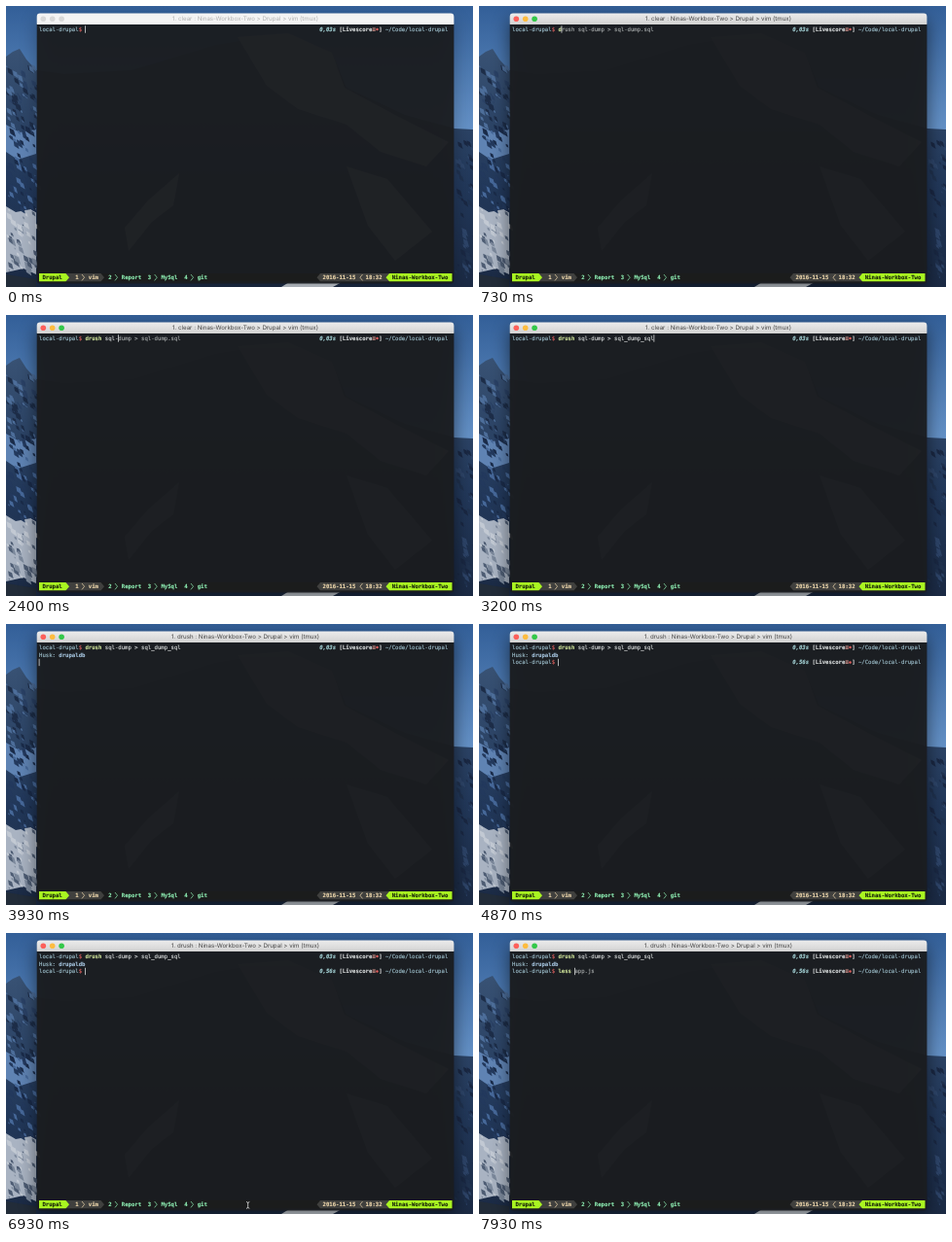
An HTML page that plays this animation: 480x289 px, repeating every 8000 ms.

```html
<!DOCTYPE html>
<html lang="en">
<head>
<meta charset="utf-8">
<title>Terminal session</title>
<style>
  html, body { margin: 0; width: 100%; height: 100%; overflow: hidden; background: #2c4f7e; }
  svg { display: block; width: 100vw; height: 100vh; }
  text { white-space: pre; text-rendering: geometricPrecision; }
  .mono text { font: 5.63px "DejaVu Sans Mono", "Noto Sans Mono", monospace; stroke-width: .1; }
  .mono .bold { font-weight: 700; }
  .mono .slant { font-weight: 700; font-style: italic; }
  #title { font: 6.15px Inter, Roboto, sans-serif; text-anchor: middle; }
</style>
</head>
<body>
<svg viewBox="0 0 480 289" preserveAspectRatio="none">
  <defs>
    <linearGradient id="sky" x2="0" y2="1">
      <stop offset="0" stop-color="#335f98"/>
      <stop offset=".45" stop-color="#6693c8"/>
    </linearGradient>
    <linearGradient id="rock" x2="0" y2="1">
      <stop offset="0" stop-color="#3b5577"/>
      <stop offset=".6" stop-color="#22385a"/>
      <stop offset="1" stop-color="#1b2a44"/>
    </linearGradient>
    <linearGradient id="bar" x2="0" y2="1">
      <stop offset="0" stop-color="#ececec"/>
      <stop offset="1" stop-color="#d2d2d2"/>
    </linearGradient>
    <filter id="blur" x="-20%" y="-20%" width="140%" height="140%">
      <feGaussianBlur stdDeviation="9"/>
    </filter>
  </defs>

  <rect width="480" height="289" fill="url(#sky)"/>
  <path d="M0 52L7 47L14 44L21 55L31 66L60 70L130 66L215 40L288 28L335 48L350 84L410 112L461 126L480 127V289H0Z" fill="url(#rock)"/>
  <path d="M238 32L290 28L335 48L348 84L400 112L455 140L432 165L385 150L350 122L300 106L268 82Z
           M178 172L172 205L150 222L126 252L122 228L146 200ZM350 165L392 178L438 232L400 262L372 226Z" fill="#a5b1c2"/>
  <path d="M0 122L14 130L31 127V152L12 158L0 150Z" fill="#5f83b3"/>
  <path d="M0 206L10 212L31 208V276L18 270L0 274Z" fill="#a9b3c2"/>
  <g id="texture"></g>
  <path d="M0 276L31 281V289H0Z" fill="#222c39"/>
  <path d="M291 284H345L336 289H283Z" fill="#c3cad2"/>
  <rect id="shadow" x="31" y="14" width="430" height="276" rx="4" filter="url(#blur)"/>

  <path d="M31.700 18H460.400V282Q460.400 285.500 457 285.500H35Q31.700 285.500 31.700 282Z" fill="#1b1d20" fill-opacity=".95"/>
  <path id="titlebar" d="M31.700 18.900V11Q31.700 7.600 35 7.600H457Q460.400 7.600 460.400 11V18.900Z"/>
  <g id="lights"></g>
  <text id="title" x="246" y="15.400"></text>
  <g id="status" class="mono"></g>
  <g id="screen" class="mono"></g>
  <path id="pointer" d="M247 276.500Q248.500 276.500 248.700 278Q249 276.500 250.300 276.500M248.700 278V282M247 283.300Q248.500 283.300 248.700 282Q249 283.300 250.300 283.300" fill="none" stroke="#ddd" stroke-width=".8"/>
</svg>
<script>
const LOOP = 8000, LEFT = 34, TOP = 26, CELL = 3.39, LINE = 7.73;
const HOST = 'Ninas-Workbox-Two';
const C = {
  path: '#a3c6d3', red: '#e0605e', command: '#cfe39a', plain: '#dde0e0', ghost: '#a9adad',
  lime: '#a9f521', grey: '#40403e', cream: '#f0d9ae', mint: '#8ff0b5', dark: '#17200a'
};
const $ = id => document.getElementById(id);
const colX = col => LEFT + col * CELL;
const escapeText = s => s.replace(/&/g, '&amp;').replace(/</g, '&lt;');
const put = (col, row, str, fill, cls = '') =>
  `<text x="${colX(col)}" y="${TOP + row * LINE}" fill="${fill}" stroke="${fill}" class="${cls}">${escapeText(str)}</text>`;
const shape = (d, fill) => `<path d="${d}" fill="${fill}"/>`;
const chevron = (x, dir, color) =>
  `<path d="M${x} 276l${2.6 * dir} 3.200l${-2.6 * dir} 3.200" fill="none" stroke="${color}" stroke-width=".7"/>`;

// Small seeded facets of rock and snow on the slopes beside the window.
function drawTexture() {
  let seed = 11;
  const rnd = () => (seed = seed * 16807 % 2147483647) / 2147483647;
  const facets = (x0, width, y0, height, count, tones) => {
    let out = '';
    for (let i = 0; i < count; i++) {
      const x = x0 + rnd() * width, y = y0 + rnd() * height, s = 1 + rnd() * 4;
      out += shape(`M${x} ${y}l${s} ${s * 0.5}l${s * 0.4} ${s * 1.5}l${-s * 1.2} ${-s * 0.8}Z`,
        tones[i % tones.length]);
    }
    return out;
  };
  $('texture').innerHTML = facets(0, 30, 60, 62, 60, ['#1d2d48', '#4d6e9a', '#2a4165'])
    + facets(0, 30, 122, 84, 60, ['#1a2b49', '#466899', '#23395d'])
    + facets(0, 30, 208, 64, 50, ['#7b889b', '#c2c9d3', '#4d5c73'])
    + facets(460, 20, 130, 152, 50, ['#1a2843', '#2e4569', '#20324f']);
}

function drawStatus() {
  const tabs = [[21, '2', 'Report'], [33, '3', 'MySql'], [44, '4', 'git']];
  let out = shape('M33 275H459V283.300H33Z', '#1b1c1c')
    + shape('M62 275H97.500L101 279.150L97.500 283.300H62Z', C.grey)
    + shape('M34 275H61.500L65 279.150L61.500 283.300H34Z', C.lime)
    + shape('M323 275H394V283.300H323L319.500 279.150Z', C.grey)
    + shape('M394 275H458.500V283.300H394L390.500 279.150Z', C.lime)
    + put(1, 33, 'Drupal', C.dark, 'bold')
    + put(11, 33, '1', C.cream, 'bold') + chevron(78, 1, C.cream) + put(15, 33, 'vim', C.cream, 'bold');
  for (const [col, number, name] of tabs)
    out += put(col, 33, number, C.mint, 'bold') + chevron(colX(col + 2), 1, C.mint)
      + put(col + 4, 33, name, C.mint, 'bold');
  out += put(86, 33, '2016-11-15', C.cream, 'bold') + chevron(366.500, -1, C.cream)
    + put(99, 33, '18:32', C.cream, 'bold') + put(107, 33, HOST, C.dark, 'bold');
  $('status').innerHTML = out;
}

function prompt(row, seconds) {
  return put(0, row, 'local-drupal', C.path) + put(12, row, '$', C.red)
    + put(85, row, seconds, '#a9d9dc', 'slant')
    + put(91, row, '[Livescore', C.plain, 'bold') + put(101, row, '≡', '#d99890', 'bold')
    + `<circle cx="${colX(102.5)}" cy="${TOP + row * LINE - 2}" r="1.250" fill="${C.red}"/>`
    + put(103, row, ']', C.plain, 'bold') + put(105, row, '~/Code/local-drupal', C.path);
}

function entry(row, line, typed) {
  const wordEnd = line.indexOf(' ');
  const head = line.slice(0, Math.min(typed, wordEnd));
  const rest = line.slice(head.length, typed);
  return put(14, row, head, C.command, 'bold') + put(14 + head.length, row, rest, C.plain)
    + put(14 + typed, row, typed ? line.slice(typed) : '', C.ghost);
}

const cursor = (col, row) =>
  `<rect x="${colX(col) - 0.3}" y="${TOP + row * LINE - 5.7}" width=".8" height="7.400" fill="#d8dada"/>`;

// Times at which each key lands.
const dumpKeys = Array.from({ length: 10 }, (_, i) => 600 + i * 195);
const lessKeys = [7130, 7270, 7400, 7600, 7800];
const ACTIVE = 330, ACCEPT = 2870, ENTER = 3600, DONE = 4200, POINTER = 5000;
const keysBefore = (keys, t) => keys.filter(k => k <= t).length;

function screenAt(t) {
  const accepted = t >= ACCEPT;
  const dump = accepted ? 'drush sql-dump > sql_dump_sql' : 'drush sql-dump > sql-dump.sql';
  const typed = accepted ? dump.length : keysBefore(dumpKeys, t);
  let out = prompt(0, '0,03s') + entry(0, dump, typed);
  if (t < ENTER) return out + cursor(14 + typed, 0);
  out += put(0, 1, 'Husk:', C.path) + put(6, 1, 'drupaldb', '#a6c5df', 'bold');
  if (t < DONE) return out + cursor(0, 2);
  const less = keysBefore(lessKeys, t);
  return out + prompt(2, '0,56s') + entry(2, 'less app.js', less) + cursor(14 + less, 2);
}

let shown = '';
function render(t) {
  const active = t >= ACTIVE;
  const screen = screenAt(t);
  if (screen !== shown) $('screen').innerHTML = shown = screen;
  $('shadow').setAttribute('opacity', active ? 0.5 : 0.25);
  $('titlebar').setAttribute('fill', active ? 'url(#bar)' : '#f4f4f4');
  $('title').setAttribute('fill', active ? '#454545' : '#b2b2b2');
  $('title').textContent = `1. ${t < ENTER ? 'clear' : 'drush'} : ${HOST} > Drupal > vim (tmux)`;
  ['#fc605b', '#fdbc40', '#34c84a'].forEach((color, i) =>
    $('lights').children[i].setAttribute('fill', active ? color : '#d9d9d9'));
  $('pointer').setAttribute('visibility', t >= POINTER && t < lessKeys[0] ? 'visible' : 'hidden');
}

$('lights').innerHTML = [38.3, 47.7, 57.1].map(x => `<circle cx="${x}" cy="13.200" r="2.800"/>`).join('');
drawTexture();
drawStatus();
const start = performance.now();
function tick() {
  render((performance.now() - start) % LOOP);
  requestAnimationFrame(tick);
}
tick();
</script>
</body>
</html>
```
